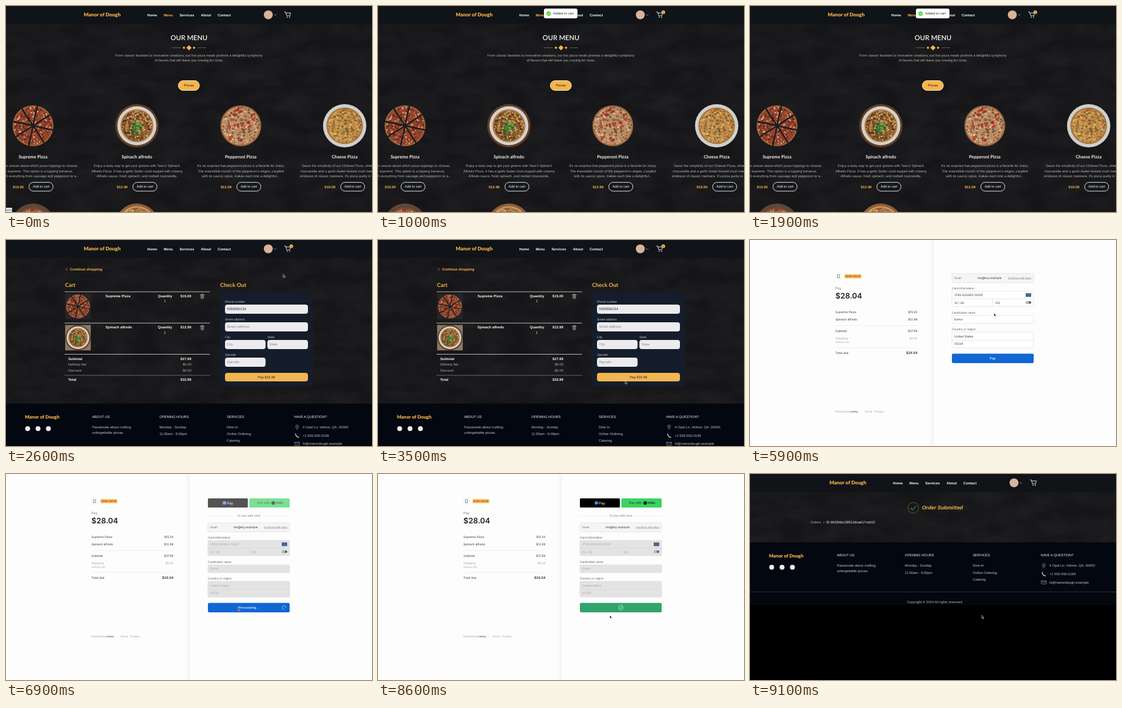
Animation of 600 by 338 pixels, one loop 9.2 s. Source, as an HTML page:

```html
<!DOCTYPE html>
<html lang="en">
<head>
<meta charset="utf-8">
<title>Pizza order</title>
<style>
  html, body { margin: 0; width: 100%; height: 100%; overflow: hidden; background: #000; }
  svg { display: block; }
  text { font-family: "Liberation Sans", Arial, sans-serif; text-rendering: geometricPrecision; white-space: pre; }
  .head { font-family: Lato, sans-serif; }
  .ui { font-family: Inter, sans-serif; }
  .bold { font-weight: 700; }
  .semi { font-weight: 600; }
  .heavy { font-weight: 900; }
  .mid { text-anchor: middle; }
  .end { text-anchor: end; }
  .italic { font-style: italic; }
  .line { fill: none; stroke-linecap: round; stroke-linejoin: round; }
</style>
</head>
<body>
<svg width="100%" height="100%" viewBox="0 0 600 338">
  <defs>
    <filter id="chalk" x="0" y="0" width="1" height="1" color-interpolation-filters="sRGB">
      <feTurbulence type="fractalNoise" baseFrequency=".02 .04" numOctaves="5" seed="8"/>
      <feColorMatrix values="0 0 0 0 1  0 0 0 0 1  0 0 0 0 1  .07 0 0 0 -.018"/>
    </filter>
    <linearGradient id="fold">
      <stop stop-color="#fdfdfd"/><stop offset=".8" stop-color="#f4f4f5"/><stop offset="1" stop-color="#fdfdfd"/>
    </linearGradient>
  </defs>
  <g id="page"></g>
  <g id="overlay"></g>
</svg>
<script>
const LOOP = 9200;
const GOLD = '#f6b44b', WHITE = '#f6f6f6', GREY = '#b1b2b6';
const BRAND = 'Manor of Dough';
const pageLayer = document.getElementById('page');
const overlay = document.getElementById('overlay');

// Drawing helpers; text is placed by its visual middle.
const text = (x, y, str, cls = '', fill = WHITE, size = cls.includes('bold') ? 5.8 : 5.64) =>
  `<text x="${x}" y="${y + size * .35}" class="${cls}" fill="${fill}" font-size="${size}">${str}</text>`;
const rect = (x, y, w, h, fill, r = 0, extra = '') =>
  `<rect x="${x}" y="${y}" width="${w}" height="${h}" rx="${r}" fill="${fill}" ${extra}/>`;
const circle = (x, y, r, fill, extra = '') => `<circle cx="${x}" cy="${y}" r="${r}" fill="${fill}" ${extra}/>`;
const line = (d, stroke, width = .7, extra = '') =>
  `<path class="line" d="${d}" stroke="${stroke}" stroke-width="${width}" ${extra}/>`;
const shift = (x, y, body) => `<g transform="translate(${x} ${y})">${body}</g>`;
const diamond = (x, y, r) => `<path d="M${x - r} ${y}l${r} ${-r} ${r} ${r} ${-r} ${r}z" fill="${GOLD}"/>`;
const ramp = (t, from, to) => {
  const k = Math.min(1, Math.max(0, (t - from) / (to - from)));
  return k * k * (3 - 2 * k);
};

// ---- pizzas ----
const KINDS = {
  supreme: { r: 33.5, base: '#8f4229', crust: '#a0643a', bits: ['#6d2418', '#d9a98a', '#3d2a20', '#b0432c', '#c98a62'] },
  spinach: { r: 27, board: '#5f3d27', plate: '#d3d1cd', base: '#8a5b2e', crust: '#b07a42', bits: ['#4a3018', '#c09050', '#6b431f', '#d6b478'] },
  pepperoni: { r: 33.5, base: '#b98a62', crust: '#9c673c', bits: ['#dcbc98', '#7c4a30', '#cfa37a', '#5d5138'] },
  cheese: { r: 30, plate: '#cfcfce', base: '#bd8a48', crust: '#a8743a', bits: ['#dcb870', '#9c5a2c', '#cfa055', '#6a5c30'] },
  meat: { r: 29, plate: '#5e4638', base: '#99553a', crust: '#7c4a30', bits: ['#c98d55', '#6c3023', '#c79a70'] },
  plain: { r: 31, plate: '#8d5f3a', base: '#b07a46', crust: '#c99a62', bits: ['#d8b070', '#93502c', '#7d5d33'] }
};

function scatter(random, radius, count, colors, size, x = 36, y = 36) {
  let out = '';
  for (let i = 0; i < count; i++) {
    const angle = random() * Math.PI * 2, dist = radius * Math.sqrt(random());
    out += circle((x + dist * Math.cos(angle)).toFixed(1), (y + dist * Math.sin(angle)).toFixed(1),
      (size * (.6 + .6 * random())).toFixed(1), colors[i % colors.length]);
  }
  return out;
}

function pizza(kind) {
  const { r, board, plate, base, crust, bits } = KINDS[kind];
  let seed = 7;
  const random = () => (seed = seed * 16807 % 2147483647) / 2147483647;
  for (let i = 0; i < 5; i++) random();
  let out = (board ? circle(36, 36, 35.5, board) : '') + (plate ? circle(36, 36, board ? 32 : 35.5, plate) : '') +
    circle(36, 36, r, crust) + circle(36, 36, r - 2.2, base);
  out += scatter(random, r - 3, 230, bits, 1.4);
  if (kind === 'spinach') out += scatter(random, 10, 34, ['#3f7a30', '#62a548', '#2f5f28'], 2, 36, 40);
  if (kind === 'pepperoni') out += scatter(random, 28, 22, ['#a83228', '#bd4436'], 2.5);
  if (kind === 'supreme') {
    for (let i = 0; i < 4; i++) {
      out += line('M36 0V72', '#1a1b1e', 2.4, `transform="rotate(${i * 45 + 12} 36 36)"`);
    }
  }
  return out;
}
const photo = (x, y, size, kind, back = 'none') =>
  `<svg x="${x}" y="${y}" width="${size}" height="${size}" viewBox="0 0 72 72">${rect(0, 0, 72, 72, back)}${pizza(kind)}</svg>`;

// ---- restaurant pages ----
const board = rect(0, 0, 600, 338, '#151517') + rect(0, 0, 600, 338, '#fff', 0, 'filter="url(#chalk)"');

function header(dx, active, count) {
  const items = { Home: 231.5, Menu: 258.5, Services: 284.5, About: 319.5, Contact: 347 };
  let out = text(127.5, 14, BRAND, 'head heavy', GOLD, 8.2);
  for (const name in items) out += text(items[name], 14.5, name, 'bold', name === active ? GOLD : WHITE);
  out += circle(430, 14.5, 7.3, '#d9b39b') + line('M439.2 13.7l2 2 2-2', '#ccc', .6);
  out += line('M456.5 9.8h1.8l2 6.2h5l1.4-4.6h-7.6', '#eee', .9) + circle(461, 18.3, .9, '#eee') + circle(465, 18.3, .9, '#eee');
  if (count) out += circle(467.7, 10.2, 3, GOLD) + text(467.7, 10.2, count, 'mid', '#222', 4);
  return rect(0, 0, 600, 29.5, '#101317') + shift(dx, 0, out);
}

function footer(top, step) {
  const column = n => 31 + n * step;
  const list = (n, title, rows, dx = 0, gap = 11.2) => text(column(n), 21.5, title) +
    rows.map((row, i) => text(column(n) + dx, 38.5 + i * gap, row, '', '#c3c5ca')).join('');
  const x = column(4) + 5;
  const body = rect(0, 0, 600, 103, '#030710') +
    text(31, 22, BRAND, 'head heavy', GOLD, 7.7) +
    [35.5, 52.5, 69.5].map(cx => circle(cx, 41, 4, '#eee')).join('') +
    list(1, 'ABOUT US', ['Passionate about crafting', 'unforgettable pizzas.'], 0, 8.6) +
    list(2, 'OPENING HOURS', ['Monday - Sunday', '11:00am - 9:00pm']) +
    list(3, 'SERVICES', ['Dine-In', 'Online Ordering', 'Catering']) +
    list(4, 'HAVE A QUESTION?', ['4 Opal Ln, Velmor, QA, 00000', '+1 555-555-0199', 'hi@manordough.example'], 14.2, 13.7) +
    line(`M${x} 42c-3.6-4-3.2-7 0-7s3.6 3 0 7z`, GREY, .6) + circle(x, 37.8, .9, GREY) +
    line(`M${x - 2.5} 49.5c0 3 2.5 5.6 5.4 5.6`, '#ccc', 1.4) +
    line(`M${x - 3.5} 63.4h7.4v5h-7.4zl3.7 2.8 3.7-2.8`, GREY, .6);
  return shift(0, top, body);
}

function menuCard(cx, name, price, kind, rows, anchor, edges) {
  return photo(cx - 36, 160.5, 72, kind) +
    text(cx, 247, name, 'head bold mid', WHITE, 7.3) +
    rows.map((row, i) => text(edges ? edges[i] : cx, 262 + i * 8.7, row, anchor, GREY)).join('') +
    text(cx - 33, 296.5, price, 'bold', GOLD) +
    rect(cx - 6.6, 289.3, 39.5, 14.5, '#15181c', 7.2, 'stroke="#f4f4f4" stroke-width=".9"') +
    text(cx + 13.2, 296.5, 'Add to cart', 'mid');
}

const menuBody =
  text(300, 52.5, 'OUR MENU', 'head semi mid', WHITE, 11.1) +
  line('M272 68.5h14M314 68.5h14', '#8a8a8c', .6) +
  diamond(291.7, 68.5, 2.2) + diamond(300, 68.5, 4.3) + diamond(308.3, 68.5, 2.2) +
  text(300, 80.8, 'From classic favorites to innovative creations, our hot pizza meals promise a delightful symphony', 'mid', GREY) +
  text(300, 89.4, 'of flavors that will leave you craving for more.', 'mid', GREY) +
  rect(282.5, 122.5, 34.5, 16, GOLD, 8, 'stroke="#fbe6c0"') + text(299.8, 130.5, 'Pizzas', 'mid', '#222') +
  menuCard(44.3, 'Supreme Pizza', '$15.00', 'supreme', ['For unsure about which pizza toppings to choose,',
    'the supreme. This option is a topping bonanza,', 'with everything from sausage and pepperoni to a...'], 'end', [118.5, 110, 119.5]) +
  menuCard(214.6, 'Spinach alfredo', '$12.99', 'spinach', ["Enjoy a tasty way to get your greens with Tavo's Spinach",
    'Alfredo Pizza. It has a garlic butter crust topped with creamy', 'Alfredo sauce, fresh spinach, and melted mozzarella.'], 'mid') +
  menuCard(384.9, 'Pepperoni Pizza', '$12.99', 'pepperoni', ["It's no surprise that pepperoni pizza is a favorite for many.",
    "The irresistible crunch of the pepperoni's edges, coupled", 'with its savory spice, makes each bite a delightful...'], 'mid') +
  menuCard(555.2, 'Cheese Pizza', '$10.00', 'cheese', ['Savor the simplicity of our Cheese Pizza, where',
    'mozzarella and a garlic-butter-kissed crust meet', "embrace of classic marinara. It's pizza purity in"], '', [485, 483, 482]) +
  photo(8.3, 323.5, 72, 'meat') + photo(178.6, 323.5, 72, 'plain');

const menuPage = (count, hover) => board + header(0, 'Menu', count) + menuBody +
  (hover ? rect(0, 331, 10, 7, '#dfe6e2', 1) + text(9, 334.6, 'menu', 'end', '#444', 4) : '');

function cartRow(y, name, price, kind, back) {
  return line(`M96.5 ${y}H334`, '#ddd', .8) + photo(97, y + 3, 42, kind, back) +
    text(163, y + 7, name, 'bold') + text(249, y + 7, 'Quantity', 'bold') + text(260.5, y + 15.5, '1', 'mid') +
    text(303.8, y + 7, price, 'bold end') +
    line(`M318.8 ${y + 5}h6M320.8 ${y + 5}v-1.2h2v1.2M319.5 ${y + 5}l.5 6h3.6l.5-6M321 ${y + 6.5}v3M322.6 ${y + 6.5}v3`, '#ddd', .6);
}

function field(x, y, w, label, value, fill) {
  return text(x, y - 4.3, label, '', '#c6c9cf', 5) + rect(x, y, w, 15, '#ececef', 4) + text(x + 3.3, y + 7.5, value, '', fill);
}

function cartPage() {
  const sums = [['Subtotal', '$27.99', 194.5], ['Delivery fee', '$5.00', 204.5], ['Discount', '-$0.00', 214.3], ['Total', '$32.99', 228.8]];
  const hint = '#85878d';
  return board + header(0, '', 2) +
    line('M100.4 46.3l-2 2 2 2', GOLD) + text(105, 48.3, 'Continue shopping', 'bold', GOLD) +
    text(96.7, 74, 'Cart', 'head bold', GOLD, 9) + text(351, 74, 'Check Out', 'head bold', GOLD, 9) +
    cartRow(85, 'Supreme Pizza', '$15.00', 'supreme', '#25242a') +
    cartRow(136.3, 'Spinach alfredo', '$12.99', 'spinach', '#8d7660') +
    line('M96.5 187.5H334', '#ddd', .8) + line('M96.5 222H334', '#aaa', .7, 'stroke-dasharray="1.5 1.5"') +
    sums.map(([label, sum, y], i) => {
      const strong = i % 3 === 0;
      return text(102, y, label, strong ? 'bold' : '', strong ? WHITE : GREY) +
        text(303.8, y, sum, strong ? 'bold end' : 'end', strong ? WHITE : GREY);
    }).join('') +
    rect(351, 85, 152, 155, '#151d2b', 3) +
    field(359, 106, 136, 'Phone number', '5555550134', '#222') +
    field(359, 135, 136, 'Street address', 'Street address', hint) +
    field(359, 164, 66.5, 'City', 'City', hint) + field(428.5, 164, 66.5, 'State', 'State', hint) +
    field(359, 193, 66.5, 'Zipcode', 'Zipcode', hint) +
    rect(359, 218, 136, 14, '#f2b54f', 4) + text(427, 225, 'Pay $32.99', 'mid', '#222') +
    footer(268.5, 110.3);
}

const orderPage = () => board + header(2.8, '', 0) +
  circle(267.6, 55.5, 8.8, 'none', 'stroke="#3f6b2b" stroke-width="1"') + line('M263.4 55.6l3 3.2 5.6-6', '#4f8a35', 1.2) +
  text(282, 55.5, 'Order Submitted', 'bold italic', GOLD, 8.5) +
  text(99, 79.5, 'Orders', '', GREY) + line('M120.2 78l1.5 1.5-1.5 1.5', GREY, .6) +
  text(125, 79.5, 'ID 6632fde139512dcad17cdc02') +
  footer(112, 111.4) + rect(0, 193, 600, .7, '#4a413a') +
  text(302.5, 210.3, 'Copyright © 2024 All rights reserved', 'mid', '#b5b7bb') +
  rect(0, 215, 600, 123, '#000');

// ---- payment pages ----
const paper = rect(0, 0, 600, 338, '#fdfdfd');
const poweredBy = x => text(x, 0, 'Powered by', 'ui', '#9a9a9c', 4.3) + text(x + 24.3, 0, 'vellop', 'ui bold', '#77777a', 4.3);

function skeletonPage(opacity) {
  const bone = (x, y, w, h) => rect(x, y, w, h, '#f0f1f4', 1);
  return paper + `<g opacity="${opacity.toFixed(2)}">` + line('M138.6 58h-2.4', '#bbb', .7) + circle(148, 58, 5, '#f0f1f4') +
    bone(143, 75, 29, 5) + bone(143, 85.5, 43, 9) +
    [106, 129].map(y => bone(143, y, 15, 15) + bone(162, y, 97, 4) + bone(162, y + 10.7, 97, 4)).join('') +
    shift(0, 282.3, poweredBy(143)) + '</g>';
}

function summary() {
  const rows = [['Supreme Pizza', '$15.00', 103], ['Spinach alfredo', '$12.99', 115.7], ['Subtotal', '$27.99', 134]];
  return rect(140.5, 40, 9, 9, '#fff', 1.5, 'stroke="#e6e6e8" stroke-width=".6"') +
    line('M143 43v-.8h4v.8M143.3 44v3h3.4v-3', '#555', .7) +
    rect(155, 41, 27.5, 7, '#ffc069', 1) + text(168.7, 44.5, 'DEMO MODE', 'ui bold mid', '#9a5410', 4) +
    text(140, 64.5, 'Pay', 'ui', '#77777a', 5.6) + text(140, 77, '$28.04', 'ui semi', '#222', 12.5) +
    rows.map(([name, sum, y]) => text(140, y, name, 'ui', '#333', 4.8) + text(274.5, y, sum, 'ui end', '#333', 4.8)).join('') +
    rect(140, 125, 134.5, .5, '#e2e2e4') + rect(140, 161, 134.5, .5, '#e2e2e4') +
    text(140, 146.3, 'Shipping', 'ui', '#a0a0a3', 4.8) + text(274.5, 146.3, '$0.05', 'ui end', '#a0a0a3', 4.8) +
    text(140, 152.8, 'Delivery fee', 'ui', '#a0a0a3', 4) +
    text(140, 170.5, 'Total due', 'ui', '#333', 4.9) + text(274.5, 170.5, '$28.04', 'ui semi end', '#222', 5.3);
}

function wallets(dim) {
  return `<g opacity="${dim ? .67 : 1}">` + rect(331, 40, 65.5, 15, '#000', 1.5) + circle(358, 47.4, 2.8, '#4285f4') +
    text(362, 47.4, 'Pay', 'ui', '#fff', 6) + rect(399, 40, 66, 15, '#3bd362', 1.5) +
    text(411.5, 47.5, 'Pay with', 'ui', '#173823', 5.3) + circle(438, 47.5, 2.9, '#10251a') +
    text(442, 47.3, 'nolu', 'ui semi', '#10251a', 5.8) + '</g>' +
    rect(331, 68, 43, .5, '#e2e2e4') + rect(422, 68, 43, .5, '#e2e2e4') +
    text(398, 68, 'Or pay with card', 'ui mid', '#77777a', 4.8);
}

function cardForm(filled, stage) {
  const busy = stage !== 'ready';
  const ink = busy ? '#a5a5a6' : filled ? '#333' : '#b0b0b2';
  const box = (y, h, fill = busy ? '#e3e3e3' : '#fff') =>
    rect(331, y, 134, h, fill, 2, 'stroke="#d9d9db" stroke-width=".6"');
  const label = (y, str) => text(331, y, str, 'ui', '#555', 4.7);
  const value = (x, y, str, hint = str) => text(x, y, filled ? str : hint, 'ui', ink, 4.9);
  const button = stage === 'done' ? '#30a46c' : '#1067d3';
  return box(80, 15, '#f5f5f6') + text(335, 87.3, 'Email', 'ui', '#666', 4.6) +
    (filled ? text(373, 87.3, 'me@my.example', 'ui', '#333', 4.9) : '') +
    text(461, 87.3, 'Continue with Nolu', 'ui end', '#77777a', 4.3) + rect(423.5, 89.3, 37.5, .4, '#99999b') +
    label(104, 'Card information') + box(109, 25) + rect(331, 121.3, 134, .5, '#d2d2d4') + rect(397.5, 121.5, .5, 12.5, '#d2d2d4') +
    value(335, 115.3, '3782 822463 10005', '1234 1234 1234 1234') + value(335, 128, '12 / 28', 'MM / YY') + value(402, 128, '123', 'CVC') +
    rect(452, 112.3, 9, 6, '#47678f') + rect(452, 125, 6.5, 5, '#b9b9bb', .7) + circle(459, 127.5, 2, '#55575c') +
    label(144, 'Cardholder name') + box(149, 13) + value(335, 155.5, 'Demo', 'Full name on card') +
    label(171.2, 'Country or region') + box(176, 26) + rect(331, 189, 134, .5, '#d2d2d4') +
    value(335, 183, 'United States') + value(335, 195.5, '01234', 'ZIP') +
    rect(331, 211.5, 134, 15.5, button, 2) +
    (stage === 'done' ? '' : text(398, 219.2, busy ? 'Processing...' : 'Pay', 'ui semi mid', '#e8f0fb', 5.3));
}

function paymentPage(withWallets, filled, stage) {
  const drop = withWallets ? 0 : 15;
  return paper + rect(294, 0, 8, 338, 'url(#fold)') +
    shift(0, drop, summary()) + (withWallets ? wallets(stage === 'busy') : '') +
    shift(0, withWallets ? 0 : -25, cardForm(filled, stage)) +
    shift(0, 266.5 + drop, poweredBy(140) + rect(181.5, -2.5, .4, 5, '#ddd') +
      text(187.5, 0, 'Terms', 'ui', '#9a9a9c', 4.3) + text(204, 0, 'Privacy', 'ui', '#9a9a9c', 4.3));
}

// ---- timeline ----
const ADDED = [700, 1500];
const SUCCESS = 8300, ORDER = 8750;

function pageAt(t) {
  if (t < 2400) return menuPage(ADDED.filter(at => t >= at).length, t < 300);
  if (t < 4150) return cartPage();
  if (t < 5300) return skeletonPage(Math.min(1, Math.max(0, (t - 4200) / 300)));
  if (t < ORDER) return paymentPage(t >= 6300, t >= 5900, t < 6800 ? 'ready' : t < SUCCESS ? 'busy' : 'done');
  return orderPage();
}

function toast(t, from, to) {
  const k = ramp(t, from, from + 150) * (1 - ramp(t, to - 150, to));
  if (!k) return '';
  return `<g opacity="${k}">` + shift(0, (k - 1) * 22, rect(272, 4.8, 55, 16, '#000', 3, 'opacity=".15"') +
    rect(272, 4.3, 55, 16, '#fff', 3) + circle(279.7, 12.4, 3.7, '#61d345') +
    line('M278 12.5l1.3 1.3 2.2-2.6', '#fff', .9) + text(287, 12.4, 'Added to cart', '', '#363636', 5.7)) + '</g>';
}

const PATH = [[2400, 461, 14], [3100, 427, 225], [3400, 405, 231], [4000, 405, 231], [4300, 410, 224],
  [5300, 410, 224], [5900, 400, 120], [6500, 380, 219], [7800, 380, 219], [8300, 380, 232], [LOOP, 380, 232]];

function cursor(t) {
  const i = PATH.findIndex(point => t < point[0]);
  if (i < 1) return '';
  const [t0, x0, y0] = PATH[i - 1], [t1, x1, y1] = PATH[i];
  const k = ramp(t, t0, t1);
  return shift(x0 + (x1 - x0) * k, y0 + (y1 - y0) * k,
    '<path d="M0 0v5l1.2-1 .9 1.8 .9-.4-.8-1.8h1.5z" fill="#111" stroke="#fff" stroke-width=".5"/>');
}

function payStatus(t) {
  if (t < 6800 || t >= ORDER) return '';
  if (t < SUCCESS) {
    return line('M456 216.2a3 3 0 1 1-3 3', '#a9cbf5', .8, `transform="rotate(${t * .6} 456 219.2)"`);
  }
  const drawn = ramp(t, SUCCESS, SUCCESS + 300);
  return circle(398, 219.2, 3.9, 'none', `stroke="#d5f0e1" stroke-width=".7" pathLength="1" stroke-dasharray="${drawn} 1"`) +
    line('M396 219.4l1.5 1.6 2.7-3.4', '#d5f0e1', .8, `pathLength="1" stroke-dasharray="${drawn} 1"`);
}

let shown = '';
function frame(now) {
  const t = now % LOOP;
  const html = pageAt(t);
  if (html !== shown) pageLayer.innerHTML = shown = html;
  overlay.innerHTML = toast(t, ADDED[0], 1200) + toast(t, ADDED[1], 2250) + payStatus(t) + cursor(t);
  requestAnimationFrame(frame);
}
frame(0);
</script>
</body>
</html>
```
